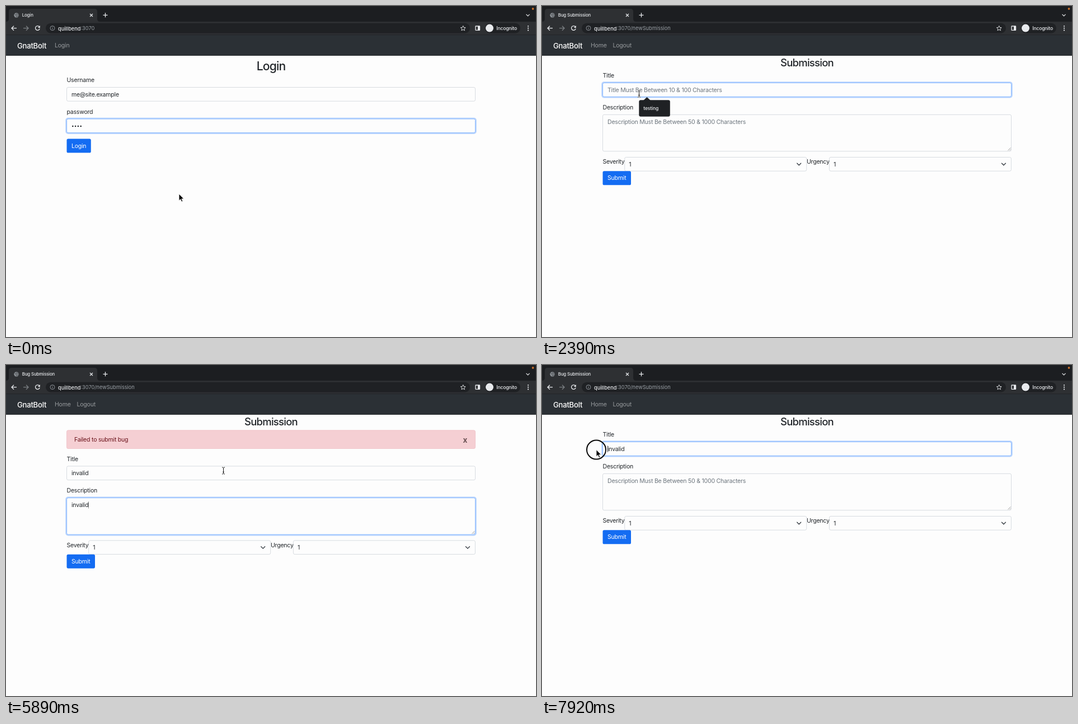
Write an HTML page that moves like this. It is 947 px wide and 592 px high and loops after 7.99 s.

```html
<!DOCTYPE html>
<html lang="en">
<head>
<meta charset="utf-8">
<title>Bug form</title>
<style>
  html, body { margin: 0; width: 100%; height: 100%; overflow: hidden; background: #fdfdfd; }
  svg { display: block; width: 947px; height: 592px; }
  text { font-family: Inter, Roboto, sans-serif; dominant-baseline: central; letter-spacing: -.02em; white-space: pre; }
</style>
</head>
<body>
<svg id="stage" viewBox="0 0 947 592"></svg>
<script>
const LOOP = 7990, HOLD = 640, STEP = 70;
const HOST = 'quillbend', PORT = ':3070';
const INK = '#212529', BODY = 10.52;
const stage = document.getElementById('stage');

// Pointer waypoints: time, x, y
const PATH = [
  [640, 309, 336], [1130, 137, 257], [1550, 137, 257], [2110, 173.5, 157],
  [3020, 173.5, 157], [3230, 185, 224], [4070, 185, 224], [4490, 148, 322],
  [4560, 148, 322], [4770, 138, 309], [4980, 138, 309], [5330, 165, 262],
  [5470, 165, 262], [5890, 388.5, 189], [6450, 388.5, 189], [6660, 134, 352],
  [6800, 134, 352], [7080, 819, 180], [7290, 819, 180], [7430, 820, 136],
  [7570, 820, 136], [7850, 97, 151.5]
];
const CLICKS = [1130, 2180, 3230, 4770, 5400, 6660, 7080, 7430, 7920];

// Latest entry wins: time from which a control has focus
const FOCUS = [
  [0, 'password'], [1270, 'login'], [2250, 'title'], [3230, 'description'],
  [4770, 'submit'], [5400, 'description'], [6730, 'submit'], [7150, ''], [7920, 'title']
];

const clamp = (v, lo, hi) => Math.min(hi, Math.max(lo, v));
const inside = (p, [x, y, w, h], pad = 0) =>
  p.x >= x - pad && p.x <= x + w + pad && p.y >= y - pad && p.y <= y + h + pad;
const typed = (t, start) => clamp((t - start) / STEP + 1, 0, 7);

function pointerAt(t) {
  const i = PATH.findIndex(p => p[0] > t);
  if (i === 0) return { x: PATH[0][1], y: PATH[0][2] };
  if (i < 0) return { x: PATH.at(-1)[1], y: PATH.at(-1)[2] };
  const [a, b] = [PATH[i - 1], PATH[i]];
  const u = (t - a[0]) / (b[0] - a[0]), e = u * u * (3 - 2 * u);
  return { x: a[1] + (b[1] - a[1]) * e, y: a[2] + (b[2] - a[2]) * e };
}

// Drawing helpers
const text = (x, y, s, size = BODY, fill = INK, attrs = '') =>
  `<text x="${x}" y="${y}" font-size="${size}" fill="${fill}" ${attrs}>${s}</text>`;
const rect = (x, y, w, h, fill, r = 0, attrs = '') =>
  `<rect x="${x}" y="${y}" width="${w}" height="${h}" rx="${r}" fill="${fill}" ${attrs}/>`;
const line = (d, color, w = 1.2, attrs = '') =>
  `<path d="${d}" fill="none" stroke="${color}" stroke-width="${w}" ${attrs}/>`;
const circle = (x, y, r, fill, attrs = '') =>
  `<circle cx="${x}" cy="${y}" r="${r}" fill="${fill}" ${attrs}/>`;
const heading = (y, s, size) =>
  text(473.5, y, s, size, INK, 'text-anchor="middle" font-weight="500" style="letter-spacing:-.038em"');
const glow = ([x, y, w, h]) =>
  rect(x - 1, y - 1, w + 2, h + 2, 'none', 3.5, 'stroke="#0d6efd" stroke-opacity=".28" stroke-width="2.6"');

function field(box, focused) {
  const [x, y, w, h] = box;
  return (focused ? glow(box) : '') +
    rect(x, y, w, h, '#fdfdfd', 2.6, `stroke="${focused ? '#86b7fe' : '#ced4da'}" stroke-width="${focused ? 1 : .8}"`);
}

function button(box, label, focused, hot) {
  const [x, y, w, h] = box;
  return (focused ? glow(box) : '') + rect(x, y, w, h, hot ? '#0d5cd6' : '#146cf2', 2.6) +
    text(x + w / 2, y + h / 2, label, BODY, '#fff', 'text-anchor="middle"');
}

function select(x, y) {
  return field([x, y, 325, 24.7]) + text(x + 7.5, y + 12.6, '1') +
    line(`M${x + 308} ${y + 10.8}l3.5 3.5 3.5-3.5`, '#343a40', 1.3, 'stroke-linecap="round"');
}

function alertBox(y, label, opacity) {
  return `<g opacity="${opacity}">` +
    rect(108.5, y, 730, 32.7, '#f5cfd3', 2.6, 'stroke="#efbfc4" stroke-width=".8"') +
    text(122, y + 16.5, label, BODY, '#6a1119') +
    text(820.3, y + 17, 'x', 13.5, '#6b5254', 'text-anchor="middle" font-weight="700"') + '</g>';
}

function browser(tab, path, loading) {
  const pale = '#e8eaed', gray = '#9aa0a6';
  const globe = circle(18.5, 16.5, 4.2, '#8b9095') +
    line('M15.5 14.5l3 1.2-1 2.3M19 12.8l.5 2 2.6.6M18.5 20.2l1-2.2 2.4-.4', '#393b3f', .9);
  const reload = loading
    ? line('M53 36l7 7M60 36l-7 7', pale, 1.3)
    : line('M59.6 37.2a3.9 3.9 0 1 0 .6 3.3', pale, 1.3) + `<path d="M60.8 35v3.9h-3.9z" fill="${pale}"/>`;
  return rect(0, 0, 947, 28, '#1c1e21') +
    `<path d="M0 28q5 0 5-5V10q0-5 5-5h148q5 0 5 5v13q0 5 5 5z" fill="#2e3033"/>` +
    rect(0, 28, 947, 24, '#2e3033') +
    (loading ? '' : globe) + text(28.7, 16.4, tab, 7.9, pale, 'font-weight="500"') +
    line('M150 14l5 5M155 14l-5 5', pale) + line('M173.5 16.3h8M177.5 12.3v8', pale, 1.3) +
    line('M929.5 14.8l3 3 3-3', pale) + circle(941.5, 5, 1.9, '#c8702b') +
    line('M19 39.7h-8.5M14 35.7l-4 4 4 4', pale, 1.3) +
    line('M31 39.7h8.5M36 35.7l4 4-4 4', '#7b7f83', 1.3) + reload +
    rect(71, 30.7, 758, 18, '#1f2124', 9) +
    circle(83, 39.6, 4, 'none', `stroke="${gray}" stroke-width=".9"`) +
    line('M83 39v2.7M83 37.2v1', gray, .9) +
    text(93, 39.8, `<tspan fill="${pale}" font-weight="500">${HOST}</tspan>${PORT}${path}`, 9.2, gray,
      'style="letter-spacing:0"') +
    line('M816.7 35.4l1.3 3 3.1.3-2.4 2.1.7 3.1-2.7-1.7-2.7 1.7.7-3.1-2.4-2.1 3.1-.3z', pale, .9) +
    rect(839, 36, 7.5, 7.3, 'none', .6, `stroke="${pale}" stroke-width="1.3"`) + rect(843, 36, 3.5, 7.3, pale) +
    rect(856, 30.7, 63, 18, '#1f2124', 9) + circle(864, 39.6, 7, pale) +
    text(876.3, 39.8, 'Incognito', 8.55, pale, 'font-weight="500"') +
    [36, 39.7, 43.4].map(y => circle(933, y, 1.1, pale)).join('');
}

function navbar(links) {
  return rect(0, 52, 947, 36.7, '#2b3035') + rect(0, 51.3, 947, .8, '#1f2225') + rect(0, 88, 947, .8, '#1d2023') +
    text(20, 70.6, 'GnatBolt', 13.15, '#fff', 'font-weight="500"') +
    links.map(([x, s]) => text(x, 70.8, s, BODY, '#979a9d')).join('');
}

function loginPage(t, focus, pointer) {
  const loading = t >= 1270, box = [108.5, 237.5, 43.3, 25];
  const user = [108.5, 145.5, 730, 24.7], pass = [108.5, 202, 730, 24.7];
  const svg = browser(loading ? `${HOST}${PORT}/list` : 'Login', loading ? '/list' : '', loading) +
    navbar([[87, 'Login']]) + heading(107.5, 'Login', 21.04) +
    text(108.5, 132.5, 'Username') + field(user) + text(117, 158.2, 'me@site.example') +
    text(108.5, 189, 'password') + field(pass, focus === 'password') +
    [119.3, 124.1, 128.9, 133.7].map(x => circle(x, 215, 1.3, INK)).join('') +
    button(box, 'Login', focus === 'login', inside(pointer, box)) +
    (loading ? rect(-3, 578, 318, 17, '#1f2124', 3) + text(3, 585.3, `Waiting for ${HOST}...`, 7.3, '#d5d7da') : '');
  return { svg, inputs: [user, pass], buttons: [box] };
}

function submissionPage(t, focus, pointer) {
  const alerts = [
    ['Failed to submit bug', 4980, 7500],
    ['Fill Out All Fields', 6800, 7200]
  ].filter(([, from, fade]) => t >= from && t < fade + 150);
  const top = 43.4 * alerts.length;
  const title = [108.5, 137.5 + top, 730, 24.8], description = [108.5, 194.3 + top, 730, 65.5];
  const submit = [108.5, 295.3 + top, 50.5, 25];
  const buttons = [submit, ...alerts.map((_, i) => [812, 125 + 43.4 * i, 17, 18])];

  const entry = (name, y, count, hint) => {
    if (!count) return text(117, y, hint, BODY, '#6c757d');
    const caret = focus === name && t < 7920 ? '<tspan dx="-1.4" font-weight="200">|</tspan>' : '';
    return text(117, y, 'invalid'.slice(0, count) + caret);
  };

  let svg = browser('Bug Submission', '/newSubmission', false) +
    navbar([[87, 'Home'], [126.5, 'Logout']]) + heading(100.5, 'Submission', 18.41) +
    alerts.map(([label, , fade], i) =>
      alertBox(116.8 + 43.4 * i, label, clamp(1 - (t - fade) / 150, 0, 1))).join('') +
    text(108.5, 124.7 + top, 'Title') + field(title, focus === 'title') +
    entry('title', 150.3 + top, typed(t, 2530), 'Title Must Be Between 10 &amp; 100 Characters') +
    text(108.5, 181.3 + top, 'Description') + field(description, focus === 'description') +
    entry('description', 207 + top, typed(t, 3580) - typed(t, 6030),
      'Description Must Be Between 50 &amp; 1000 Characters') +
    line(`M832.5 ${258.5 + top}l5-5M835.5 ${258.5 + top}l2-2`, '#777', .7) +
    text(108.5, 278.8 + top, 'Severity') + select(147.7, 270.5 + top) +
    text(473, 278.8 + top, 'Urgency') + select(513.4, 270.5 + top) +
    button(submit, 'Submit', focus === 'submit' && t < 7150, inside(pointer, submit, 3));

  if (t >= 7920) svg += rect(117, 144.5, .8, 11.5, INK);
  if (t >= 2320 && t < 2530) {
    svg += `<path d="M181 169l6.5-6 6.5 6z" fill="#1f2124"/>` + rect(173.3, 168.3, 55.5, 29.5, '#1f2124', 3) +
      text(181.3, 183.3, 'testing', 8.55, '#e8eaed', 'font-weight="500"');
  }
  return { svg, inputs: [title, description], buttons };
}

function pointerShape({ x, y }, page) {
  let shape;
  if (page.buttons.some(b => inside({ x, y }, b))) {
    shape = '<path d="M-1 1q0-1.6 1.2-1.6T1.4 1v4.5l.3-.9q2-.3 2 1 2-.4 2 1.1 2-.1 2 1.4v2.5q0 1.2-1.3 3H.5Q-.8 11.500-3.700 8.300q-.6-1.400.8-1.500L-1 8z" fill="#fff" stroke="#000" stroke-width="1"/>' +
      line('M1.5 9v2.800M3.500 9v2.800M5.400 9v2.800', '#000', .7);
  } else if (page.inputs.some(b => inside({ x, y }, b))) {
    const beam = 'M-2.500-6q2 0 2.500 1 .5-1 2.500-1M0-5V5M-2.500 6q2 0 2.500-1 .5 1 2.500 1M-1.300 2.500h2.600';
    shape = line(beam, '#fff', 2) + line(beam, '#111', 1);
  } else {
    shape = '<path d="M0 0v12.300l2.800-2.600 2 4.500 2.100-.9-2-4.400h3.900z" fill="#000" stroke="#fff" stroke-width=".9"/>';
  }
  return `<g transform="translate(${x} ${y})">${shape}</g>`;
}

function scene(t) {
  const pointer = pointerAt(t);
  const focus = FOCUS.findLast(f => f[0] <= t)[1];
  const page = (t < 1690 ? loginPage : submissionPage)(t, focus, pointer);
  const pressed = CLICKS.some(c => t >= c && t < c + 140);
  return page.svg +
    (pressed ? circle(pointer.x, pointer.y, 17, 'none', 'stroke="#080808" stroke-width="2"') : '') +
    pointerShape(pointer, page);
}

let shown = -1;
function draw() {
  const now = performance.now() % LOOP;
  const t = now < HOLD ? 0 : HOLD + Math.floor((now - HOLD) / STEP) * STEP;
  if (t !== shown) stage.innerHTML = scene(shown = t);
  requestAnimationFrame(draw);
}
draw();
</script>
</body>
</html>
```
